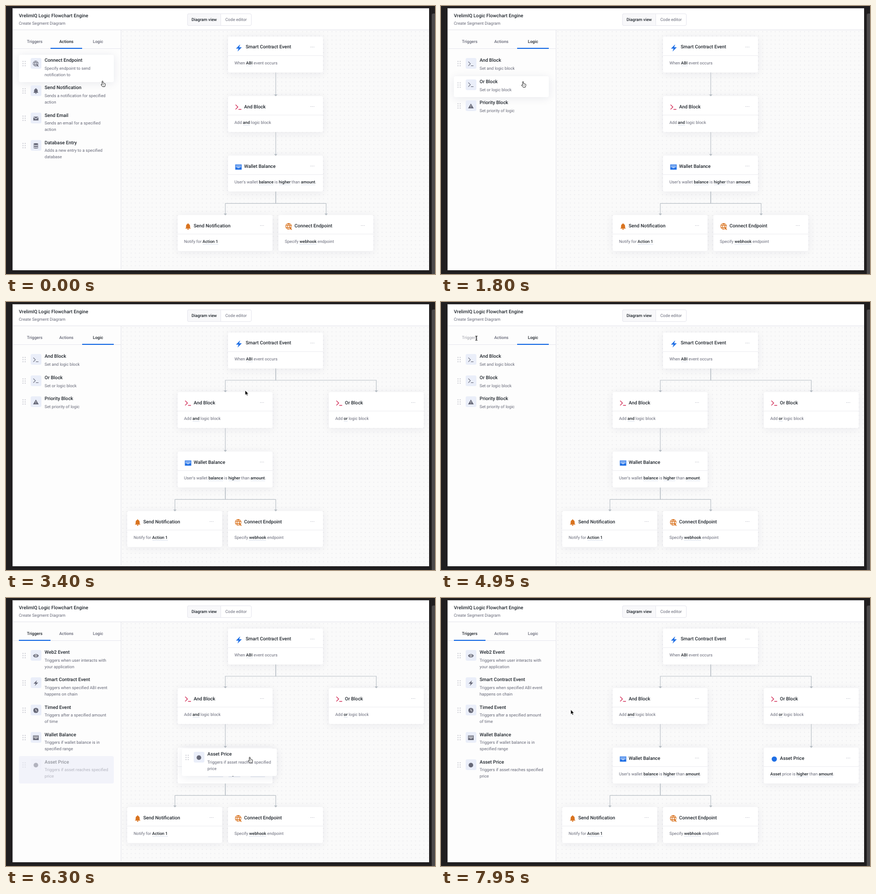
Animation of 800x500 px, one loop 8000 ms. Source, as an HTML page:

```html
<!DOCTYPE html>
<html lang="en">
<head>
<meta charset="utf-8">
<title>Flowchart editor</title>
<style>
html, body { margin: 0; width: 100%; height: 100%; overflow: hidden; background: #201e1f; }
#stage { position: relative; width: 800px; height: 500px; overflow: hidden; font-family: Roboto, sans-serif; text-rendering: geometricPrecision; }
#stage div, #stage svg { position: absolute; box-sizing: border-box; }
#stage svg { overflow: visible; }
.t { white-space: nowrap; line-height: 11.6px; }
.canvas { left: 214px; top: 44px; width: 575px; height: 449px; background: #fafafa radial-gradient(circle, #efeff1 .7px, transparent 1px) 0 0 / 7.8px 7.8px; }
.card { width: 177px; height: 67px; background: #fff; border-radius: 3px; box-shadow: 0 2px 16px rgba(22, 33, 74, .07); }
.card hr { position: absolute; left: 0; top: 35px; width: 177px; height: 1px; margin: 0; border: 0; background: #eeeef2; }
.item { width: 177px; border-radius: 3px; }
.hover { background: #fff; box-shadow: 0 2px 16px rgba(22, 33, 74, .09); }
.taken { background: #f2f3fa; }
.taken > * { opacity: .45; }
.tile { left: 22px; top: 6px; width: 20px; height: 20px; border-radius: 3px; background: #eaeef9; }
.tab { text-align: center; font: 500 7.8px/12px Roboto, sans-serif; }
b { font-weight: 500; color: #20262d; border-bottom: 1px solid #dde3ee; }
</style>
</head>
<body>
<div id="stage"></div>
<script>
const INK = '#20262d', GREY = '#676978', BLUE = '#1f6fe5', RED = '#d0234f', ORANGE = '#d9731f';

const box = (x, y, w, h, css, inner = '', cls = '') =>
  `<div class="${cls}" style="left:${x}px;top:${y}px;width:${w}px;height:${h}px;${css}">${inner}</div>`;
const text = (x, cy, str, size = 7.8, color = GREY, weight = 400) =>
  `<div class="t" style="left:${x}px;top:${cy - 5.1}px;font-size:${size}px;color:${color};font-weight:${weight}">${str}</div>`;
const label = (x, cy, str) => text(x, cy, str, 8.9, INK, 500);
const line = (d, w = 2) => `<path d="${d}" fill="none" stroke="currentColor" stroke-width="${w}"/>`;
const solid = d => `<path d="${d}" fill="currentColor"/>`;

function dots(x, y, cols, rows, gap, r) {
  let out = '';
  for (let i = 0; i < cols * rows; i++)
    out += `<circle cx="${x + i % cols * gap}" cy="${y + Math.floor(i / cols) * gap}" r="${r}"/>`;
  return `<svg width="1" height="1" style="left:0;top:0" fill="#b4b6c0">${out}</svg>`;
}

const icons = {
  bolt: solid('M16 1 3 14h8L8 23 21 10h-8z'),
  term: line('M2 4l8 8-8 8M12 20h10', 2.2),
  bell: solid('M12 1a2 2 0 0 1 2 2c3 1 5 4 5 8v5l3 3H2l3-3v-5c0-4 2-7 5-8a2 2 0 0 1 2-2M9 20h6a3 3 0 0 1-6 0'),
  globe: line('M13 21A10 10 0 1 1 21 13M3 8h18M3 15h10M11 21C6 15 6 7 11 2c4 3 5 7 5 11') + solid('M13 12l10 4-4 2 4 4-2 2-4-4-2 4z'),
  mail: solid('M2 5h20l-10 7zM2 8l10 7 10-7v12H2z'),
  db: solid('M3 5c0-4 18-4 18 0v2c0 4-18 4-18 0zM3 10c3 4 15 4 18 0v4c0 4-18 4-18 0zM3 17c3 4 15 4 18 0v3c0 4-18 4-18 0z'),
  eye: solid('M1 12C6 3 18 3 23 12 18 21 6 21 1 12') + '<circle cx="12" cy="12" r="4.5" fill="#fff"/><circle cx="12" cy="12" r="2.5" fill="currentColor"/>',
  clock: '<circle cx="12" cy="12" r="10" fill="currentColor"/><path d="M12 6v7l5 2" fill="none" stroke="#fff" stroke-width="2"/>',
  warn: solid('M12 2 23 21H1z') + '<path d="M12 9v5M12 16v2" stroke="#fff" stroke-width="2"/>',
  wallet: solid('M1 3h22v18H1z') + '<path d="M3 5h18v8h-4q-1 3-5 3t-5-3H3z" fill="#fff" opacity=".6"/>' + line('M3 8.500h18', 1.5),
  coin: '<circle cx="12" cy="12" r="9" fill="currentColor"/>'
};
const icon = (name, cx, cy, size, color) =>
  `<svg viewBox="0 0 24 24" width="${size}" height="${size}" style="left:${cx - size / 2}px;top:${cy - size / 2}px;color:${color}">${icons[name]}</svg>`;

const tabs = ['Triggers', 'Actions', 'Logic'];
const lists = [
  [['eye', 'Web2 Event', 'Triggers when user interacts with<br>your application'],
   ['bolt', 'Smart Contract Event', 'Triggers when specified ABI event<br>happens on chain'],
   ['clock', 'Timed Event', 'Triggers after a specified amount<br>of time'],
   ['wallet', 'Wallet Balance', 'Triggers if wallet balance is in<br>specified range'],
   ['coin', 'Asset Price', 'Triggers if asset reaches specified<br>price']],
  [['globe', 'Connect Endpoint', 'Specify endpoint to send<br>notification to'],
   ['bell', 'Send Notification', 'Sends a notification for specified<br>action'],
   ['mail', 'Send Email', 'Sends an email for a specified<br>action'],
   ['db', 'Database Entry', 'Adds a new entry to a specified<br>database']],
  [['term', 'And Block', 'Set and logic block'],
   ['term', 'Or Block', 'Set or logic block'],
   ['warn', 'Priority Block', 'Set priority of logic']]
];
const pitch = tab => tab === 2 ? 39.5 : 51.1;

const item = ([glyph, name, desc], x, y, h, cls) =>
  box(x, y, 177, h, '', dots(7.7, 12.4, 2, 3, 4, .85) + '<div class="tile"></div>' +
    icon(glyph, 32, 16.4, 11.5, GREY) + label(48, 11.5, name) + text(48, 25.2, desc), 'item ' + cls);

function card(x, row, glyph, color, name, desc) {
  const bolt = glyph === 'bolt';
  return box(x, 57 + row * 111.15, 177, 67, '', '<hr>' + dots(154.6, 19.6, 3, 1, 2.8, .7) +
    icon(glyph, bolt ? 20 : 19, 20.8, bolt ? 14.5 : 13, color) + label(bolt ? 33 : 30, 20.5, name) +
    text(12, 49, desc.replace(/\*(.+?)\*/g, '<b>$1</b>')), 'card');
}

// Connector from the bottom of a card to the tops of cards one row below
function links(x, row, ...ends) {
  const y = 124 + row * 111.15;
  return ends.map(e => `<path d="M${x} ${y}V${y + 22}H${e}V${y + 42}" fill="none" stroke="#bfc5cb" stroke-width="1.2"/>` +
    `<path d="M${e - 3} ${y + 41}h6l-3 3.5z" fill="#b4bbc2"/>`).join('');
}

function diagram(step) {
  const s = step ? -94 : 0, main = 503 + s;
  let wires = step ? links(503, 0, main, 690.5) : links(503, 0, 503);
  wires += links(main, 1, main) + links(main, 2, main - 94, main + 94);
  if (step > 1) wires += links(690.5, 1, 690.5);
  return card(414, 0, 'bolt', BLUE, 'Smart Contract Event', 'When *ABI* event occurs') +
    card(414 + s, 1, 'term', RED, 'And Block', 'Add *and* logic block') +
    card(414 + s, 2, 'wallet', BLUE, 'Wallet Balance', "User's wallet *balance* is *higher* than *amount*.") +
    card(320 + s, 3, 'bell', ORANGE, 'Send Notification', 'Notify for *Action 1*') +
    card(508 + s, 3, 'globe', ORANGE, 'Connect Endpoint', 'Specify *webhook* endpoint') +
    (step ? card(602, 1, 'term', RED, 'Or Block', 'Add *or* logic block') : '') +
    (step > 1 ? card(602, 2, 'coin', BLUE, 'Asset Price', '*Asset* price is *higher* than *amount*.') : '') +
    `<svg width="800" height="500" style="left:0;top:0">${wires}</svg>`;
}

function sidebar(tab, hot, taken, hotTab) {
  const h = pitch(tab);
  return box(12, 44, 203, 449, 'background:#fdfdfd;border-right:1px solid #e6e6ec') +
    box(12, 79, 202, 1, 'background:#e8e8ef') + box(24 + tab * 59, 77.6, 59, 2.4, `background:${BLUE}`) +
    tabs.map((name, i) => box(24 + i * 59, 60.6, 59, 12,
      `color:${i === tab ? INK : GREY};opacity:${i === hotTab && i !== tab ? .5 : 1}`, name, 'tab')).join('') +
    lists[tab].map((it, i) => item(it, 24, 91 + i * h, h, i === taken ? 'taken' : i === hot ? 'hover' : '')).join('');
}

const header = box(12, 4, 777, 41, 'background:#fff;border-bottom:1px solid #e6e6ec') +
  label(24, 19.5, 'VrelimIQ Logic Flowchart Engine') + text(24, 32.5, 'Create Segment Diagram') +
  box(338, 13.5, 120, 23, 'border:1px solid #e8e8ef;border-radius:3px;background:#fff') +
  box(338, 13.5, 63, 23, 'border:1px solid #e8e8ef;border-radius:3px 0 0 3px;background:#f8f8fa') +
  text(346, 25, 'Diagram view', 7.8, INK, 500) + text(409, 25, 'Code editor');

const bezel = box(0, 0, 800, 500, 'border:solid #201e1f;border-width:4px 11px 7px 12px') +
  box(12, 4, 777, 489, 'border:solid #c9c9cc;border-width:1px 0 0 1px') +
  box(794, 14, 6, 486, 'background:#4b494a;border-radius:3px 0 0 0');

const pointers = {
  arrow: '<path d="M0 0v8.6l2-1.8 1.4 3 1.5-.7-1.4-2.9h2.7z" fill="#000" stroke="#fff" stroke-width=".6"/>',
  beam: '<path d="M-2-4q2 0 2 1.2q0-1.2 2-1.2M0-3v6M-2 4q2 0 2-1.2q0 1.2 2 1.2" fill="none" stroke="#111" stroke-width="1.1"/>',
  hand: '<path d="M-.9.8a.9.9 0 0 1 1.8 0v3l1.5.2 1.5.4 1.3.8v2.5l-1 2.8h-4.2l-2.8-3.6q.2-1.3 1.9 0z" fill="#fff" stroke="#222" stroke-width=".9"/><path d="M1 6v2M2.5 6v2" stroke="#222" stroke-width=".5"/>'
};

// Pointer path: time, x, y
const path = [
  [0, 180, 140], [150, 180, 137], [550, 173, 67], [900, 172, 68], [1450, 156, 134], [1750, 153, 141], [1850, 153, 141],
  [2250, 530, 160], [2350, 532, 159], [2550, 430, 200], [2650, 430, 200], [2850, 427, 206], [3000, 427, 206], [3250, 446, 165],
  [3400, 446, 165], [4000, 150, 90], [4350, 75, 68], [4900, 66, 67.5], [5100, 66, 67.5], [5600, 143, 270], [5800, 150.5, 318],
  [5950, 151, 311], [6000, 151, 311], [6600, 755, 283], [6800, 755, 283], [6900, 751, 281], [7100, 740, 285],
  [7650, 270, 214], [7800, 242, 208.5], [8000, 242, 208.5]
];
// Drags: time span, tab and item, grip offset, drop dot and the x where it appears
const drags = [
  { from: 1850, to: 2350, tab: 2, i: 1, dx: 129, dy: 10.5, dot: [503, 124], near: 400 },
  { from: 6000, to: 6900, tab: 0, i: 4, dx: 127, dy: 16, dot: [691.5, 235], near: 650 }
];

function pointerAt(t) {
  const n = path.findIndex(p => p[0] > t), [t0, x0, y0] = path[n - 1], [t1, x1, y1] = path[n];
  const k = (t - t0) / (t1 - t0), e = k * k * (3 - 2 * k);
  return [x0 + (x1 - x0) * e, y0 + (y1 - y0) * e];
}

document.getElementById('stage').innerHTML =
  '<div class="canvas"></div><div id="flow"></div><div id="side"></div>' + header +
  '<div id="drag"></div>' + bezel + '<svg id="pointer" width="1" height="1"></svg>';
const [flow, side, drag, pointer] = ['flow', 'side', 'drag', 'pointer'].map(id => document.getElementById(id));
const shown = new Map();
function put(el, html) {
  if (shown.get(el) !== html) { shown.set(el, html); el.innerHTML = html; }
}

function draw(t) {
  const [x, y] = pointerAt(t);
  const tab = t < 700 ? 1 : t < 5000 ? 2 : 0;
  const held = drags.find(d => t >= d.from && t < d.to);
  const inSide = !held && x >= 24 && x < 201;
  const hot = inSide && y >= 91 ? Math.floor((y - 91) / pitch(tab)) : -1;
  const overItem = hot >= 0 && hot < lists[tab].length;
  const hotTab = inSide && y > 57 && y < 79 ? Math.floor((x - 24) / 59) : -1;

  put(flow, diagram(t < 2350 ? 0 : t < 6900 ? 1 : 2));
  put(side, sidebar(tab, hot, held ? held.i : -1, hotTab));
  let html = '';
  if (held) {
    const [cx, cy] = held.dot;
    if (x > held.near) html = box(cx - 5.2, cy - 5.2, 10.4, 10.4, `border-radius:50%;background:${BLUE};border:1.8px solid #a9cbf6`);
    html += item(lists[held.tab][held.i], x - held.dx, y - held.dy, pitch(held.tab), 'hover');
  }
  put(drag, html);
  put(pointer, pointers[held || overItem ? 'hand' : hotTab >= 0 ? 'beam' : 'arrow']);
  pointer.style.transform = `translate(${x}px,${y}px)`;
}

const start = performance.now();
function tick() {
  draw((performance.now() - start) % 8000);
  requestAnimationFrame(tick);
}
tick();
</script>
</body>
</html>
```
